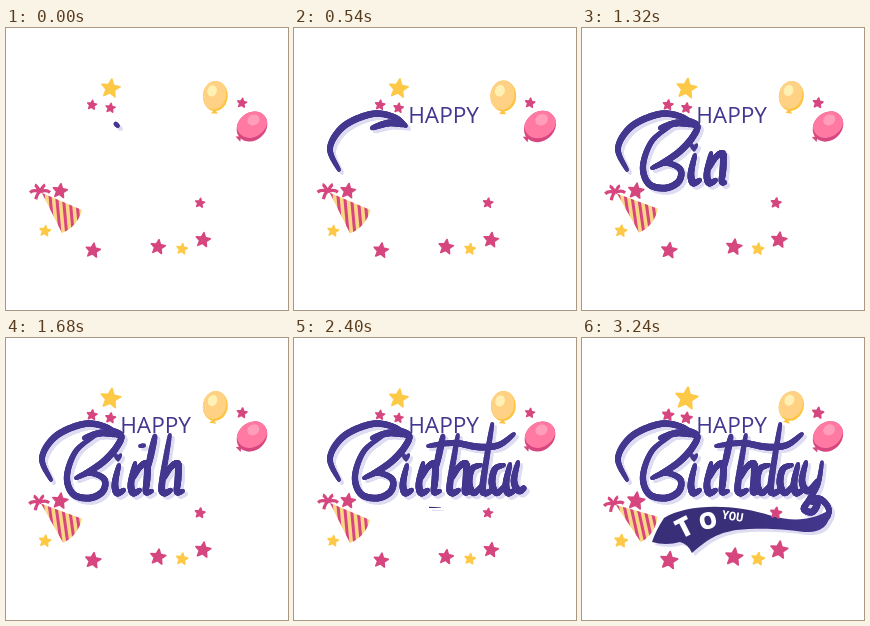
An HTML page with a canvas for the animation above (3.74 s loop, 282 by 282 pixels).

```html
<!DOCTYPE html>
<html lang="en">
<head>
<meta charset="utf-8">
<title>Happy Birthday To You</title>
<style>
html, body { margin: 0; width: 100%; height: 100%; overflow: hidden; background: #fff; }
canvas { display: block; width: 282px; height: 282px; }
</style>
</head>
<body>
<canvas id="stage"></canvas>
<script>
const SIZE = 282, LOOP = 3740, STEP = 60, LAST = 3240;
const INK = '#43378f', DARK = '#392e78', SHADE = '#dedcf2', PINK = '#d6467f', GOLD = '#fdc946';
const BASE = 157;
const canvas = document.getElementById('stage');
const ctx = canvas.getContext('2d');
const dpr = window.devicePixelRatio || 1;
canvas.width = canvas.height = SIZE * dpr;

const clamp = v => Math.max(0, Math.min(1, v));
const rad = d => d * Math.PI / 180;
const knots = text => text.split(' ').map(s => s.split(',').map(Number));

// Parts shared by the handwritten letters
const stem = (x, top) => [[x + (BASE - top) * 0.13, top], [x, BASE - 12], [x + 2, BASE - 2], [x + 9, BASE - 5]];
const arch = x => [[x, 141], [x + 7, 129], [x + 14, 126], [x + 14, 141], [x + 13, BASE - 3], [x + 19, BASE - 4]];
const bowl = x => [[x + 12, 127], [x + 3, 131], [x, 145], [x + 5, BASE - 2], [x + 14, 146]];

const swoop = knots('112,98 100,89 78,86 50,98 36,120 45,142');
const hook = knots('111,97 95,95 78,100');
const bigB = knots('70,140 84,135 98,141 97,153 84,160 67,156 61,138 70,113 90,97');
const topB = knots('100,90 115,97 110,110 97,124 82,134 70,140');
const bar = knots('134,108 160,105 185,109 205,107 220,96');
const cup = knots('224,124 220,143 226,153 236,142');
const tail = knots('240,124 236,146 227,162 222,171 230,174 235,166 228,162 238,161 246,169 246,178 239,187');

const strokes = [
  ...lay([swoop, hook], -25, 540),
  ...lay([
    bigB, topB, stem(109, 127), stem(125, 125), arch(127), [[149, 98], [142, 130]],
    stem(156, 97), arch(158), bar, bowl(175), stem(189, 86), bowl(198), stem(212, 126), cup, tail
  ], 560, 2680)
];

const ribbon = new Path2D('M82 180C105 166 150 165 190 178C212 184 232 182 247 172' +
  'C249 186 241 195 222 194C195 190 175 190 154 192C132 196 124 203 110 215Q106 206 98 204Q84 208 70 204Q74 192 82 180Z');

const group = (color, r, text) => knots(text).map(([x, y]) => ({ x, y, r, color }));
const stars = [
  ...group(GOLD, 10.4, '104.5,60.5'),
  ...group(GOLD, 6.2, '39,203 176,221'),
  ...group(PINK, 8.2, '54,163 87,222.5 152,219 197,212'),
  ...group(PINK, 5.5, '86,77 104.5,80 236,75 194,175')
];

// Shares a time span among strokes by their length
function lay(list, start, end) {
  const size = p => p.slice(1).reduce((sum, [x, y], i) => sum + Math.hypot(x - p[i][0], y - p[i][1]), 0);
  const rate = (end - start) / list.reduce((sum, p) => sum + size(p), 0);
  return list.map(p => {
    const from = start, span = size(p) * rate;
    start += span;
    return { from, span, path: smooth(p) };
  });
}

// Catmull-Rom samples through the knots
function smooth(p) {
  const out = [];
  for (let i = 0; i < p.length - 1; i++) {
    const a = p[Math.max(0, i - 1)], b = p[i], c = p[i + 1], d = p[Math.min(p.length - 1, i + 2)];
    for (let k = 0; k < 14; k++) {
      const u = k / 14;
      out.push(b.map((v, j) => v + u / 2 * (c[j] - a[j] +
        u * (2 * a[j] - 5 * v + 4 * c[j] - d[j] + u * (3 * (v - c[j]) + d[j] - a[j])))));
    }
  }
  out.push(p[p.length - 1]);
  return out;
}

function brush(path, part) {
  const n = path.length - 1, stop = Math.round(n * part);
  for (let i = 1; i <= stop; i++) {
    ctx.lineWidth = 3 + 3.8 * Math.sqrt(Math.sin(Math.PI * i / (n + 1)));
    ctx.beginPath();
    ctx.moveTo(...path[i - 1]);
    ctx.lineTo(...path[i]);
    ctx.stroke();
  }
}

function heart(x, y) {
  ctx.beginPath();
  ctx.moveTo(x, y + 5);
  ctx.bezierCurveTo(x - 8, y - 2, x - 3, y - 7, x, y - 2);
  ctx.bezierCurveTo(x + 4, y - 7, x + 7, y - 1, x, y + 5);
  ctx.fill();
}

function lettering(t, color, bandColor) {
  ctx.strokeStyle = ctx.fillStyle = color;
  ctx.lineCap = 'round';
  for (const s of strokes) brush(s.path, clamp((t - s.from) / s.span));
  if (t >= 720) heart(112, 119);
  ctx.save();
  ctx.beginPath();
  if (t >= 2580) ctx.rect(174 - (t - 2760) * 0.39, 150, SIZE, 70);
  if (t >= 1920) ctx.rect(135, 160, 12, 10);
  ctx.clip();
  ctx.fillStyle = bandColor;
  ctx.fill(ribbon);
  if (color === INK && t >= 2580) {
    word('T', 102, 189, 27, -27, '"Open Sans"');
    word('O', 126, 182.5, 23, -14, '"Open Sans"');
    word('YOU', 150.5, 178, 12, 9, '"Noto Sans Mono"');
  }
  ctx.restore();
}

function word(text, x, y, size, tilt, family) {
  place(x, y, tilt, 1, () => {
    ctx.fillStyle = '#fff';
    ctx.font = `800 ${size}px ${family}, sans-serif`;
    ctx.textAlign = 'center';
    ctx.fillText(text, 0, size * 0.36);
  });
}

function happy(t) {
  ctx.save();
  ctx.beginPath();
  ctx.rect(112, 70, 78 * clamp(t / 480), 34);
  ctx.clip();
  ctx.fillStyle = INK;
  ctx.font = '22.6px "Open Sans", "Noto Sans", sans-serif';
  ctx.textAlign = 'left';
  ctx.fillText('HAPPY', 114.2, 95);
  ctx.restore();
}

function place(x, y, tilt, scale, draw) {
  ctx.save();
  ctx.translate(x, y);
  ctx.rotate(rad(tilt));
  ctx.scale(scale, scale);
  draw();
  ctx.restore();
}

function star({ x, y, r, color }, scale) {
  place(x, y, 8, scale, () => {
    ctx.fillStyle = ctx.strokeStyle = color;
    ctx.lineWidth = 1.6;
    ctx.lineJoin = 'round';
    ctx.beginPath();
    for (let i = 0; i < 10; i++) {
      const a = rad(i * 36 - 90), d = (r - 0.8) * (i % 2 ? 0.46 : 1);
      ctx.lineTo(d * Math.cos(a), d * Math.sin(a));
    }
    ctx.closePath();
    ctx.fill();
    ctx.stroke();
  });
}

function oval(x, y, rx, ry, color, tilt = 0) {
  ctx.fillStyle = color;
  ctx.beginPath();
  ctx.ellipse(x, y, rx, ry, rad(tilt), 0, 7);
  ctx.fill();
}

function balloon(x, y, tilt, scale, rx, ry, shift, [body, shade, glow]) {
  place(x, y, tilt, scale, () => {
    ctx.fillStyle = shade;
    ctx.beginPath();
    ctx.moveTo(0, ry - 2);
    ctx.lineTo(3.5, ry + 2.5);
    ctx.lineTo(-3.5, ry + 2.5);
    ctx.fill();
    oval(0, 0, rx, ry, shade);
    ctx.clip();
    oval(-shift, -shift, rx, ry, body);
    oval(-rx * 0.28, -ry * 0.33, rx * 0.38, ry * 0.38, glow, 15);
  });
}

function hat(tilt, scale) {
  place(50, 182, tilt, scale, () => {
    ctx.translate(-50, -182);
    ctx.save();
    ctx.beginPath();
    ctx.moveTo(36, 165);
    ctx.lineTo(76, 182);
    ctx.quadraticCurveTo(71, 199, 56, 205);
    ctx.closePath();
    ctx.clip();
    ctx.fillStyle = '#fbd784';
    ctx.fillRect(30, 160, 50, 50);
    ctx.strokeStyle = PINK;
    ctx.lineWidth = 3;
    for (let i = 0; i < 6; i++) {
      ctx.beginPath();
      ctx.moveTo(37 + i * 6.6, 163);
      ctx.lineTo(41 + i * 6.6, 207);
      ctx.stroke();
    }
    ctx.restore();
    ctx.strokeStyle = PINK;
    ctx.lineWidth = 3.2;
    ctx.lineCap = 'butt';
    for (let i = 0; i < 5; i++) {
      const a = rad(115 + i * 62);
      ctx.beginPath();
      ctx.moveTo(34, 164);
      ctx.quadraticCurveTo(34 + 6 * Math.cos(a), 161 + 4 * Math.sin(a), 34 + 10 * Math.cos(a), 164 + 8 * Math.sin(a));
      ctx.stroke();
    }
  });
}

function draw(t) {
  // Two swelling beats, then a gentle sway
  const pulse = Math.sin(Math.PI * t / 600) ** 2;
  const grow = t < 1200 ? pulse : 0, sway = t < 1200 ? 0 : pulse;
  ctx.setTransform(dpr, 0, 0, dpr, 0, 0);
  ctx.fillStyle = '#fff';
  ctx.fillRect(0, 0, SIZE, SIZE);
  const band = ctx.createLinearGradient(150, 0, 248, 0);
  band.addColorStop(0, DARK);
  band.addColorStop(1, INK);
  ctx.save();
  ctx.translate(3, 3);
  lettering(t, SHADE, SHADE);
  ctx.restore();
  lettering(t, INK, band);
  happy(t);
  for (const s of stars) star(s, 1 + 0.2 * pulse);
  hat(-8 * sway, 1 + 0.18 * grow);
  balloon(209.3, 68, 3 - 13 * grow + 15 * sway, 1 + 0.4 * grow, 12.4, 15, 1.7, ['#fed184', '#fdc441', '#fff1b4']);
  balloon(246, 98.5, 48 + 7 * grow - 4 * sway, 1 + 0.42 * grow, 13.8, 16.5, 2.6, ['#ff79a3', PINK, '#ff9dbb']);
}

function tick(now) {
  const t = now % LOOP;
  draw(Math.min(LAST, Math.floor(t / STEP) * STEP));
  requestAnimationFrame(tick);
}
draw(0);
requestAnimationFrame(tick);
</script>
</body>
</html>
```
